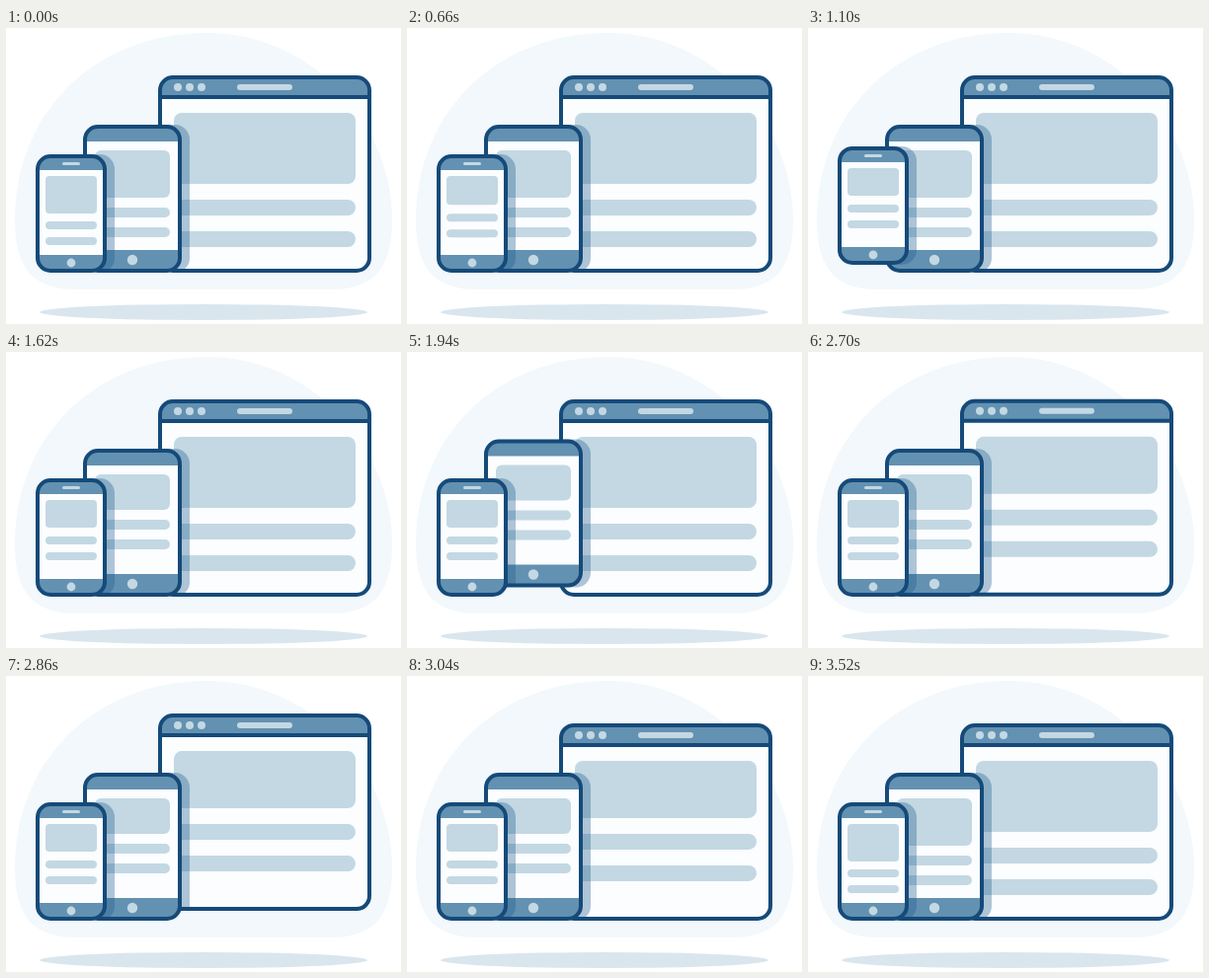
These frames come from a looping animation (400x300 px, 3560 ms). An HTML page with a canvas:

```html
<!DOCTYPE html>
<html lang="en">
<head>
<meta charset="utf-8">
<title>Responsive devices</title>
<style>
html, body { margin: 0; width: 100%; height: 100%; overflow: hidden; background: #fff; }
canvas { display: block; width: 400px; height: 300px; }
</style>
</head>
<body>
<canvas id="stage" width="400" height="300"></canvas>
<script>
const ctx = document.getElementById('stage').getContext('2d');
const LOOP = 3560;
const INK = '#154a79', BAR = '#6391b1', LIGHT = '#c3d8e3', SCREEN = '#fbfdfe';
const SHADE = 'rgba(30, 90, 140, 0.35)';
const GROW = [3225, 3535];

const blob = new Path2D(
  'M9 190C12 80 95 5 203 5C310 5 388 95 391 190C392 240 375 265 330 265L70 265C25 265 8 240 9 190Z');

// Back to front; frame and picture boxes are [x, y, width, height].
const devices = [
  {
    frame: [156, 50, 212, 196], head: 19, foot: 0, castShadow: false,
    picture: [170, 86, 184, 72], corner: 8, bars: [174, 206], barHeight: 16,
    shrinkBy: 14, barShift: 14, shrink: [2200, 2540], hop: [2685, 3050],
    trim() {
      box(156, 68, 212, 4, 0, INK);
      for (const x of [174, 186, 198]) dot(x, 60, 4);
      box(234, 57, 56, 6, 3, LIGHT);
    }
  },
  {
    frame: [80, 100, 96, 146], head: 15, foot: 21, castShadow: true,
    picture: [90, 124, 76, 48], corner: 6, bars: [182, 202], barHeight: 10,
    shrinkBy: 12, barShift: 12, shrink: [1300, 1630], hop: [1730, 2095],
    trim() { dot(128, 235, 5.2); }
  },
  {
    frame: [32, 130, 68, 116], head: 14, foot: 16, castShadow: true,
    picture: [40, 150, 52, 38], corner: 4, bars: [196, 212], barHeight: 8,
    shrinkBy: 10, barShift: 9, shrink: [420, 735], hop: [865, 1230],
    trim() {
      box(57, 136, 18, 3, 1.5, LIGHT);
      dot(66, 238, 4.4);
    }
  }
];

function progress(t, [start, end]) {
  return Math.min(1, Math.max(0, (t - start) / (end - start)));
}

function ease(u) {
  return (1 - Math.cos(Math.PI * u)) / 2;
}

function roundRect(x, y, w, h, r) {
  ctx.beginPath();
  ctx.roundRect(x, y, w, h, r);
}

function box(x, y, w, h, r, color) {
  roundRect(x, y, w, h, r);
  ctx.fillStyle = color;
  ctx.fill();
}

function dot(x, y, r) {
  ctx.beginPath();
  ctx.arc(x, y, r, 0, Math.PI * 2);
  ctx.fillStyle = LIGHT;
  ctx.fill();
}

function hopOffset(device, t) {
  return -10 * ease(2 * progress(t, device.hop));
}

function drawDevice(device, t, next) {
  const [x, y, w, h] = device.frame;
  const small = ease(progress(t, device.shrink)) - ease(progress(t, GROW));
  const lift = hopOffset(device, t);

  ctx.save();
  ctx.translate(0, lift);

  ctx.save();
  roundRect(x, y, w, h, 13);
  ctx.clip();
  box(x, y, w, h, 0, SCREEN);
  box(x, y, w, device.head, 0, BAR);
  box(x, y + h - device.foot, w, device.foot, 0, BAR);

  const [px, py, pw, ph] = device.picture;
  box(px, py, pw, ph - device.shrinkBy * small, device.corner, LIGHT);
  for (const barY of device.bars) {
    box(px, barY - device.barShift * small, pw, device.barHeight, device.barHeight / 2, LIGHT);
  }
  device.trim();

  // The device in front shades this screen.
  if (next && next.castShadow) {
    const [sx, sy, sw, sh] = next.frame;
    box(sx + 6, sy - 2 + hopOffset(next, t) - lift, sw + 4, sh + 4, 15, SHADE);
  }
  ctx.restore();

  roundRect(x, y, w, h, 13);
  ctx.strokeStyle = INK;
  ctx.lineWidth = 4;
  ctx.stroke();
  ctx.restore();
}

function render(now) {
  const t = now % LOOP;
  ctx.fillStyle = '#fff';
  ctx.fillRect(0, 0, 400, 300);
  ctx.fillStyle = '#f2f8fb';
  ctx.fill(blob);

  ctx.beginPath();
  ctx.ellipse(200, 288, 166, 8, 0, 0, Math.PI * 2);
  ctx.fillStyle = '#d9e6ee';
  ctx.fill();

  devices.forEach((device, i) => drawDevice(device, t, devices[i + 1]));
}

let startTime = null;
function tick(now) {
  if (startTime === null) startTime = now;
  render(now - startTime);
  requestAnimationFrame(tick);
}
render(0);
requestAnimationFrame(tick);
</script>
</body>
</html>
```
